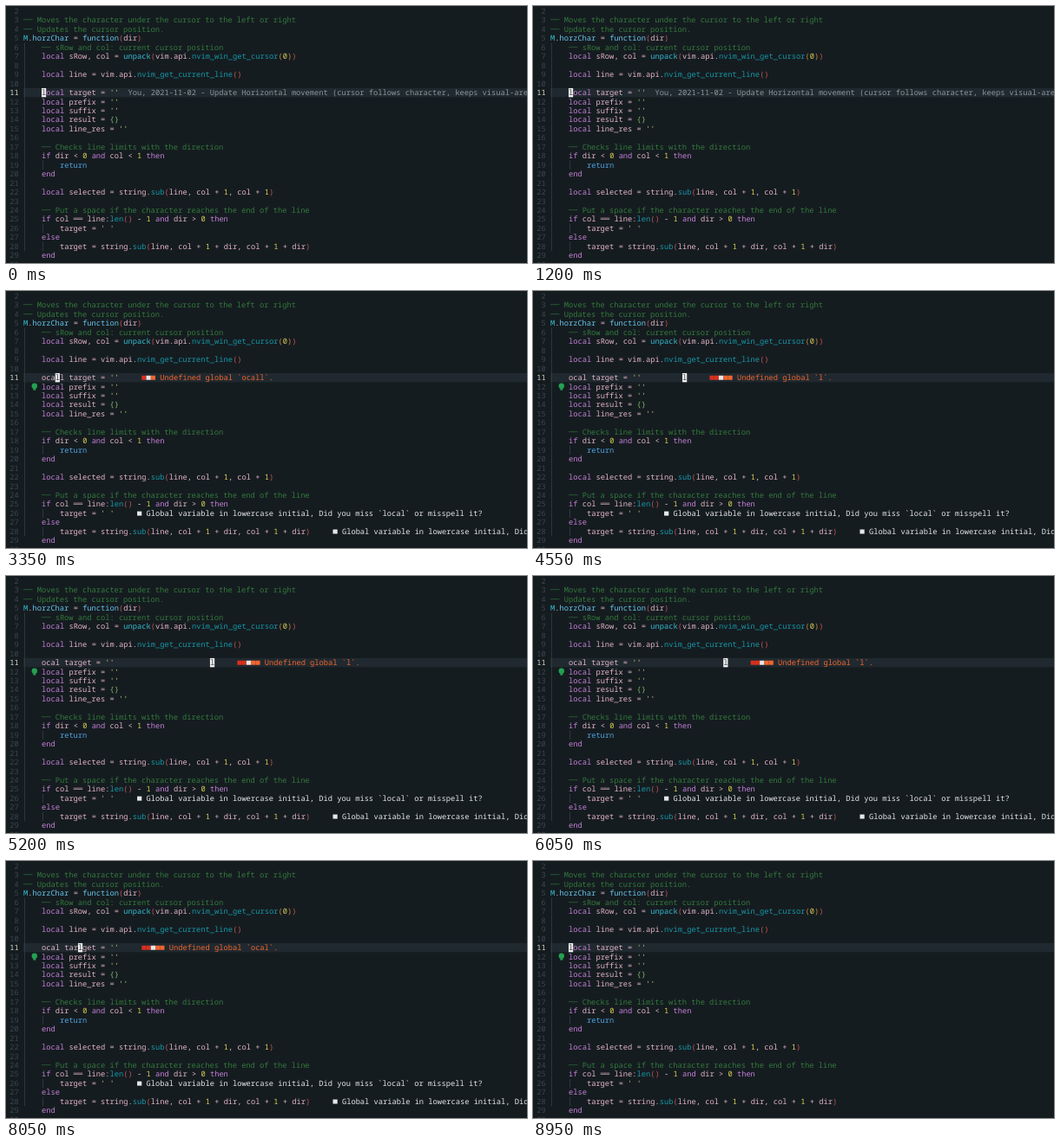
Write an HTML page that moves like this. It is 600 px wide and 297 px high and loops after 9 s.

```html
<!DOCTYPE html>
<html lang="en">
<head>
<meta charset="utf-8">
<title>Moving a character in the editor</title>
<style>
  html, body { margin: 0; width: 100%; height: 100%; overflow: hidden; background: #151c20; }
  svg { display: block; width: 100vw; height: 100vh; }
  text { font: 8.737px "Noto Sans Mono", "DejaVu Sans Mono", monospace; text-rendering: geometricPrecision; }
</style>
</head>
<body>
<svg viewBox="0 0 600 297" preserveAspectRatio="none">
  <rect width="600" height="297" fill="#151c20"/>
  <rect x="20" y="94.9" width="580" height="10.4" fill="#20292f"/>
  <g id="page"></g>
  <g id="live"></g>
</svg>
<script>
const LOOP = 9000, CELL = 5.242, ROW = 10.46, LEFT = 20;
const ACTIVE = 11, INDENT = 4, DIAGNOSTIC_GAP = 5;
const DIAGNOSTICS_ON = 2500, DIAGNOSTICS_OFF = 8750, BULB_ON = 2950;

const color = {
  plain: '#e3b5c8', keyword: '#c580d8', blue: '#4fa3e0', call: '#1698a8', builtin: '#35bcd0',
  comment: '#337a3c', number: '#d9cf55', string: '#c5cf83', brace: '#7fb36b',
  parens: ['#c9534d', '#c98a45'], gutter: '#3a474e', activeGutter: '#d5d8c5',
  blame: '#8b979d', hint: '#e4e7e8', error: '#d8301f', warning: '#f0652f', guide: '#38444a',
  cursor: '#f0f0f0', bulb: '#25a052'
};
const words = { M: color.builtin, horzChar: '#67c6ec', unpack: color.builtin,
                return: color.blue, function: '#67c6ec' };
for (const w of ['local', 'if', 'and', 'then', 'else', 'end']) words[w] = color.keyword;
const bold = new Set(['M', 'horzChar', 'unpack']);

// The active line is left empty here and drawn with the cursor.
const code = `

-- Moves the character under the cursor to the left or right
-- Updates the cursor position.
M.horzChar = function(dir)
    -- sRow and col: current cursor position
    local sRow, col = unpack(vim.api.nvim_win_get_cursor(0))

    local line = vim.api.nvim_get_current_line()


    local prefix = ''
    local suffix = ''
    local result = {}
    local line_res = ''

    -- Checks line limits with the direction
    if dir < 0 and col < 1 then
        return
    end

    local selected = string.sub(line, col + 1, col + 1)

    -- Put a space if the character reaches the end of the line
    if col == line:len() - 1 and dir > 0 then
        target = ' '
    else
        target = string.sub(line, col + 1 + dir, col + 1 + dir)
    end
`.split('\n');

// Cursor column over time; equal columns mark a pause.
const path = [[0, 4], [2100, 4], [3100, 7], [3400, 7], [4550, 29], [5200, 41],
              [5800, 41], [6050, 38], [7300, 22], [8600, 4], [LOOP, 4]];

const xOf = col => LEFT + col * CELL;
const yOf = line => 6 + (line - 2) * ROW;
const escapeText = s => s.replace(/&/g, '&amp;').replace(/</g, '&lt;');
const box = (x, y, w, h, fill) =>
  `<rect x="${x}" y="${y}" width="${w}" height="${h}" fill="${fill}"/>`;
const label = (str, col, line, fill, weight = 400) =>
  `<text x="${xOf(col)}" y="${yOf(line) + 2.9}" fill="${fill}" font-weight="${weight}">${escapeText(str)}</text>`;
const square = (col, line, fill) => box(xOf(col), yOf(line) - 2.4, CELL, 5, fill);

function highlight(source, line) {
  let depth = 0, out = '';
  for (const m of source.matchAll(/--.*|'[^']*'?|==|[A-Za-z_]\w*|\d+|[^\s]/g)) {
    const token = m[0], next = source[m.index + token.length];
    let fill = color.plain;
    if (token.startsWith('--')) fill = color.comment;
    else if (token[0] === "'") fill = color.string;
    else if (words[token]) fill = words[token];
    else if (/^\d/.test(token)) fill = color.number;
    else if (/^\w/.test(token) && next === '(') fill = color.call;
    else if (token === '(') fill = color.parens[depth++];
    else if (token === ')') fill = color.parens[--depth];
    else if (/[{}]/.test(token)) fill = color.brace;
    // Joined dashes and equals signs imitate the editor's ligatures.
    const shown = token.replace(/^--/, '──').replace('==', '══');
    out += label(shown, m.index, line, fill, bold.has(token) ? 700 : 400);
  }
  return out;
}

function drawPage() {
  let out = '';
  for (let line = 2; line <= 30; line++) {
    const number = String(line);
    out += label(number, -1 - number.length, line,
                 line === ACTIVE ? color.activeGutter : color.gutter);
    const source = code[line - 1];
    if (line > 5 && line < 29) out += box(21, yOf(line) - 5.2, .7, ROW, color.guide);
    if (source.startsWith('        ')) out += box(42, yOf(line) - 5.2, .7, ROW, color.guide);
    out += highlight(source, line);
  }
  return out;
}

function cursorAt(time) {
  const i = path.findIndex(([t]) => t > time);
  const [t0, c0] = path[i - 1], [t1, c1] = path[i];
  return Math.round(c0 + (c1 - c0) * (time - t0) / (t1 - t0));
}

function drawErrors(index, end) {
  const first = end + DIAGNOSTIC_GAP;
  const name = index < 5 ? 'ocal'.slice(0, index) + 'l' + 'ocal'.slice(index)
             : index < 12 ? 'ocal' : 'l';
  const marks = index < 5 ? [color.error, color.hint, color.warning]
              : [color.error, color.error, color.hint, color.warning, color.warning];
  return marks.map((fill, i) => square(first + i, ACTIVE, fill)).join('') +
    label('Undefined global `' + name + '`.', first + marks.length + 1, ACTIVE, color.warning);
}

function drawHint(line) {
  const col = code[line - 1].length + DIAGNOSTIC_GAP;
  return square(col, line, color.hint) +
    label('Global variable in lowercase initial, Did you miss `local` or misspell it?',
          col + 2, line, color.hint);
}

function drawBulb() {
  const y = yOf(12);
  return `<circle cx="32.8" cy="${y - .8}" r="3.2" fill="${color.bulb}"/>` +
    box(31.3, y + 1.8, 3, 2.2, color.bulb);
}

function drawLive(col, blame, diagnostics, bulb) {
  const index = col - INDENT, rest = "ocal target = ''".padEnd(index);
  const source = ' '.repeat(INDENT) + rest.slice(0, index) + 'l' + rest.slice(index);
  let out = highlight(source, ACTIVE);
  out += box(xOf(col), yOf(ACTIVE) - 5.2, CELL, 10.4, color.cursor) +
         label('l', col, ACTIVE, '#3a4247');
  if (blame) out += label('You, 2021-11-02 - Update Horizontal movement ' +
    '(cursor follows character, keeps visual-area)', 23, ACTIVE, color.blame);
  if (diagnostics) out += drawErrors(index, source.length) + drawHint(26) + drawHint(28);
  if (bulb) out += drawBulb();
  return out;
}

const live = document.getElementById('live');
let previous = '';
document.getElementById('page').innerHTML = drawPage();

function frame() {
  const time = performance.now() % LOOP, col = cursorAt(time);
  const state = [col, time < 3000 && col === INDENT,
                 time >= DIAGNOSTICS_ON && time < DIAGNOSTICS_OFF, time >= BULB_ON];
  if (String(state) !== previous) {
    previous = String(state);
    live.innerHTML = drawLive(...state);
  }
  requestAnimationFrame(frame);
}
frame();
</script>
</body>
</html>
```
